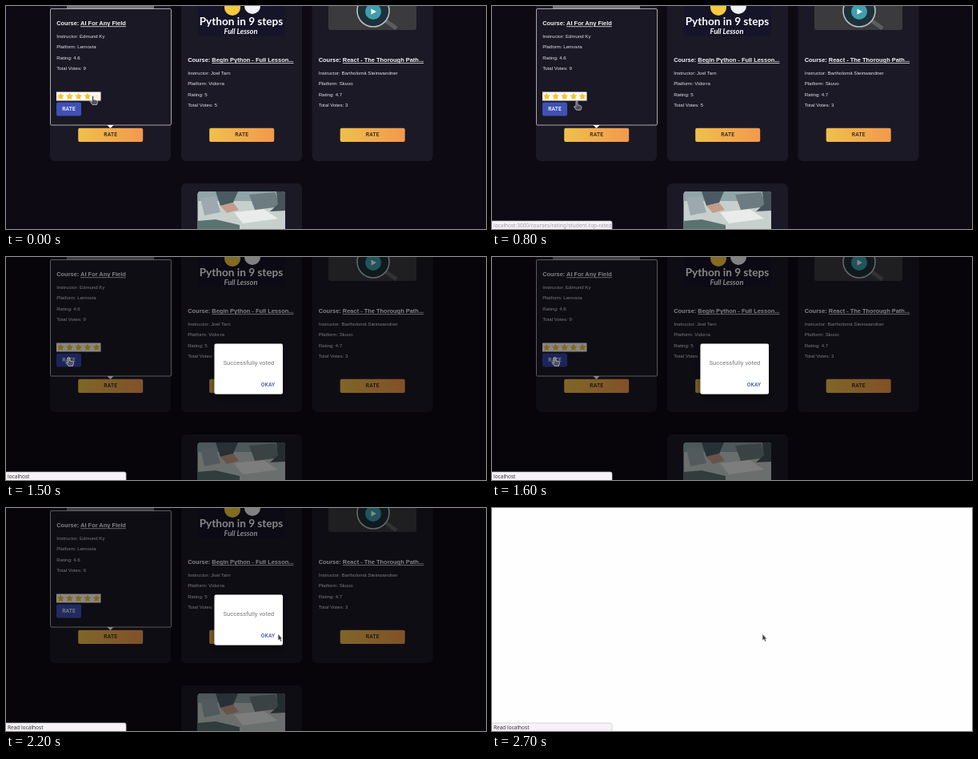
Recreate the animation shown at these times as an HTML page. Size 600 px wide and 279 px high, loop 2.8 s.

```html
<!DOCTYPE html>
<html lang="en">
<head>
<meta charset="utf-8">
<title>Course rating</title>
<style>
html, body { margin: 0; width: 100%; height: 100%; overflow: hidden; background: #fefefe; }
svg { display: block; width: 600px; height: 279px; }
.body { font: 6.1px "Liberation Sans", Arial, sans-serif; fill: #e4e3e8; }
.title { font: bold 7.45px "Liberation Sans", Arial, sans-serif; fill: #f4f4f6; }
.title tspan { text-decoration: underline; }
.button { font: 500 6.7px Roboto, sans-serif; letter-spacing: .03em; text-anchor: middle; }
.banner { font: bold 13.6px Lato, sans-serif; fill: #fff; text-anchor: middle; }
.status { font: 6.5px "Noto Sans", sans-serif; }
</style>
</head>
<body>
<svg viewBox="0 0 600 279">
  <defs>
    <linearGradient id="orange"><stop stop-color="#efc04c"/><stop offset="1" stop-color="#f2994d"/></linearGradient>
    <clipPath id="photoClip"><rect x="239.5" y="232" width="109.5" height="60" rx="4"/></clipPath>
    <clipPath id="lensClip"><rect x="403" y="-20" width="110" height="50" rx="3"/></clipPath>
    <filter id="shadow" x="-30%" y="-30%" width="160%" height="170%">
      <feDropShadow dx="0" dy="4" stdDeviation="5" flood-opacity=".6"/>
    </filter>
  </defs>

  <g id="page">
    <rect width="600" height="279" fill="#0d0a13"/>
    <g id="cards"></g>

    <rect x="76" y="-5" width="109" height="9" fill="#77757a"/>

    <rect x="240" y="-5" width="109" height="43" rx="3" fill="#161428"/>
    <circle cx="283" cy="2" r="10" fill="#f5c940"/>
    <circle cx="308" cy="0" r="10" fill="#f2f2f4"/>
    <text class="banner" x="294" y="24">Python in 9 steps</text>
    <text class="banner" x="293.5" y="34.7" style="font-size:9.2px;font-style:italic">Full Lesson</text>

    <g clip-path="url(#lensClip)">
      <rect x="403" y="-20" width="110" height="50" fill="#3b3b3e"/>
      <path d="M474 18L488 28" stroke="#5d5e61" stroke-width="5"/>
      <circle cx="459" cy="6" r="20" fill="#1f3138" stroke="#b9c1c3" stroke-width="1.6"/>
      <circle cx="459" cy="7" r="10" fill="#3f9fae"/>
      <path d="M456.5 3.5L463 7L456.5 10.5Z" fill="#fff"/>
    </g>

    <g clip-path="url(#photoClip)">
      <rect x="239" y="232" width="111" height="47" fill="#c8d0ce"/>
      <rect x="239" y="232" width="111" height="12" fill="#8fa6a8"/>
      <path d="M243 240L262 238L268 258L248 262Z" fill="#9caab0"/>
      <path d="M262 232H290L284 246L268 250Z" fill="#4a5a62"/>
      <path d="M268 250L284 246L291 255L276 259Z M306 257L318 252L324 258L312 263Z" fill="#c49c8b"/>
      <path d="M304 236L336 233L344 251L311 255Z" fill="#6d7c80"/>
      <path d="M338 232H350V256L330 257L340 248Z" fill="#46535b"/>
      <path d="M285 258L322 254L340 266L296 272Z" fill="#e9ecea"/>
      <path d="M239 269L262 267L292 274V279H239Z" fill="#5a7370"/>
    </g>

    <rect x="55.5" y="3.5" width="151" height="145.5" rx="1.5" fill="#1b1825" stroke="#d8d7dc" stroke-width=".75"/>
    <path d="M126.5 149H134.5L130.5 153Z" fill="#fff"/>
    <g id="popupText"></g>
    <rect x="63" y="107.5" width="55.5" height="11" fill="#fff"/>
    <g id="stars"></g>
    <rect id="rate" x="63" y="120.5" width="31" height="17" rx="2"/>
    <text class="button" x="78.6" y="131.3" fill="#fff">RATE</text>

    <rect id="dim" width="600" height="279"/>
    <g id="dialog">
      <rect x="260.5" y="108.5" width="85.5" height="63" rx="2" fill="#fff" filter="url(#shadow)"/>
      <text x="271.5" y="135" fill="#757575" style="font:7.5px Roboto,sans-serif;letter-spacing:.01em">Successfully voted</text>
      <text class="button" x="327.5" y="162" fill="#3f51b5">OKAY</text>
    </g>
  </g>

  <g id="statusBar">
    <path d="M-1 269H148Q150 269 150 271V280H-1Z" fill="#f6f2f7" stroke="#c9c5cc" stroke-width=".7"/>
    <text class="status" id="status" x="2" y="276.8"></text>
  </g>
  <path id="hand" fill="#50525c" stroke="#d5d5da" stroke-width=".7"
    d="M-1 0Q0-1 1 0V4L5 5Q6 5.5 6 7L5 10.5H-.5L-3.5 6.5Q-3.5 5-1 6.5Z"/>
  <path id="arrow" fill="#404145" stroke="#fff" stroke-width=".6" d="M0 0V8.5L2 6.8L3.4 9.7L4.9 9L3.6 6.2H5.8Z"/>
</svg>

<script>
const LOOP = 2800, STEP = 100;
const $ = id => document.getElementById(id);

const courses = [
  { x: 55, name: "AI For Any Field", by: "Edmund Ky", platform: "Lernovia", rating: 4.6, votes: 9 },
  { x: 219, name: "Begin Python - Full Lesson...", by: "Joel Tarn", platform: "Vidorra", rating: 5, votes: 5 },
  { x: 382.5, name: "React - The Thorough Path...", by: "Bartholomä Steinwandner", platform: "Skuvo", rating: 4.7, votes: 3 }
];

function details(c, y) {
  const lines = [`Instructor: ${c.by}`, `Platform: ${c.platform}`, `Rating: ${c.rating}`, `Total Votes: ${c.votes}`];
  const x = c.x + 8.2;
  return `<text class="title" x="${x}" y="${y}">Course: <tspan>${c.name}</tspan></text>` +
    lines.map((s, i) => `<text class="body" x="${x}" y="${y + 15.5 + i * 13.5}">${s}</text>`).join("");
}

const panel = (x, y, h) => `<rect x="${x}" y="${y}" width="151" height="${h}" rx="6" fill="#1c1926"/>`;

$("cards").innerHTML = panel(219, 222, 80) + courses.map((c, i) =>
  panel(c.x, -10, 204) + (i ? details(c, 70) : "") +
  `<rect x="${c.x + 35.2}" y="152.7" width="81" height="17.3" rx="2" fill="url(#orange)"/>
   <text class="button" x="${c.x + 75.7}" y="163.3" fill="#2a2118">RATE</text>`).join("");
$("popupText").innerHTML = details(courses[0], 24.4);

function star(cx, cy) {
  const points = Array.from({ length: 10 }, (_, i) => {
    const r = i % 2 ? 2.4 : 4.7, a = i * Math.PI / 5;
    return `${cx + r * Math.sin(a)},${cy - r * Math.cos(a)}`;
  });
  return `<polygon points="${points.join(" ")}" fill="#f8c52a"/>`;
}
$("stars").innerHTML = [0, 1, 2, 3, 4].map(i => star(68.3 + i * 11.2, 113.3)).join("");
const lastStar = $("stars").lastElementChild;

// time, x, y of the pointer tip
const path = [
  [0, 108.5, 113], [100, 108.5, 113], [500, 111, 118.5], [700, 111, 118.5], [1100, 78.5, 125.8],
  [1700, 78.5, 125.8], [2100, 340, 157.5], [2500, 340, 157.5], [2700, 338, 157.5], [LOOP, 338, 157.5]
];
const messages = [
  [0, ""], [300, "localhost:3000/courses/rating/student-top-rated"], [900, ""],
  [1500, "localhost"], [1800, "Read localhost"], [2300, "Waiting for localhost…"], [2600, "Read localhost"]
];

const clamp = v => Math.min(1, Math.max(0, v));
const smooth = v => v * v * (3 - 2 * v);

function pointer(t) {
  const i = path.findIndex(p => p[0] > t);
  const [t0, x0, y0] = path[i - 1], [t1, x1, y1] = path[i];
  const k = smooth((t - t0) / (t1 - t0));
  return [x0 + (x1 - x0) * k, y0 + (y1 - y0) * k];
}

const show = (id, on) => $(id).setAttribute("visibility", on ? "visible" : "hidden");

function draw(t) {
  show("page", t < 2300);
  lastStar.setAttribute("opacity", t < 200 ? 0.25 : 1);
  $("rate").setAttribute("fill", t >= 1000 && t < 1800 ? "#3545a6" : "#3f51b5");

  const fade = clamp((t - 1200) / 300);
  $("dim").setAttribute("opacity", 0.47 * fade);
  $("dialog").setAttribute("opacity", fade);

  const message = messages.findLast(m => m[0] <= t)[1];
  show("statusBar", message);
  $("status").textContent = message;
  $("status").setAttribute("fill", t < 900 ? "#a398aa" : "#38363c");

  const isHand = t < 1700;
  show("hand", isHand);
  show("arrow", !isHand);
  $("hand").setAttribute("opacity", t >= 300 && t < 800 ? 0.5 : 1);
  $(isHand ? "hand" : "arrow").setAttribute("transform", `translate(${pointer(t)})`);
}

function tick() {
  draw(Math.floor(performance.now() % LOOP / STEP) * STEP);
  requestAnimationFrame(tick);
}
tick();
</script>
</body>
</html>
```
